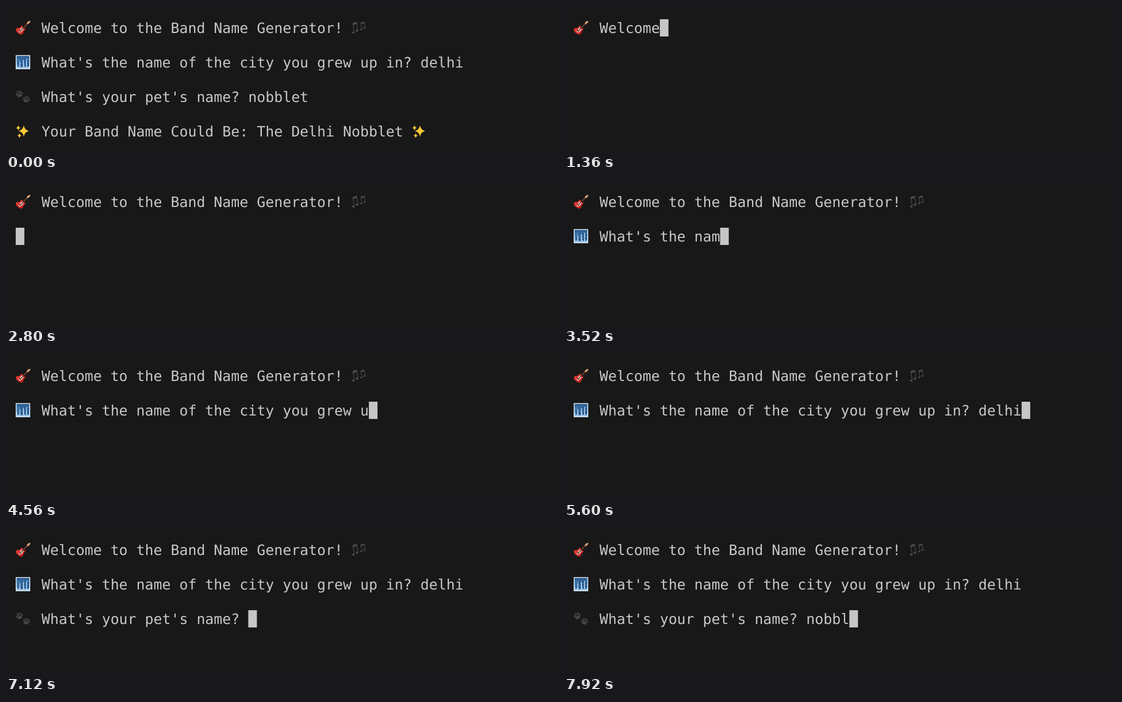
Recreate the animation shown at these times as an HTML page. Size 960 px wide and 254 px high, loop 8 s.

```html
<!DOCTYPE html>
<html lang="en">
<head>
<meta charset="utf-8">
<title>Band Name Generator</title>
<style>
html, body { margin: 0; width: 100%; height: 100%; overflow: hidden; background: #181818; }
svg { display: block; }
text {
  font: 24.88px "DejaVu Sans Mono", "Liberation Mono", monospace;
  fill: #c8c8c8; white-space: pre; text-rendering: geometricPrecision;
}
</style>
</head>
<body>
<svg id="stage" width="960" height="254" viewBox="0 0 960 254">
  <defs>
    <linearGradient id="sky" x2="0" y2="1">
      <stop stop-color="#245689"/><stop offset=".6" stop-color="#5b96cb"/><stop offset="1" stop-color="#c4dff3"/>
    </linearGradient>
    <linearGradient id="red" x2="1" y2="1">
      <stop stop-color="#f0473c"/><stop offset="1" stop-color="#b5120f"/>
    </linearGradient>

    <!-- Icons sit in a 26 x 30 cell -->
    <g id="guitar">
      <path d="M12 16 21 7" stroke="#6b3d2b" stroke-width="2.4"/>
      <path d="M19 7 22 3.6 25.6 3 24.8 5.6 21 9Z" fill="#e0a877"/>
      <path d="M.4 19C-.2 16.500 2 15 5 15.400 7.500 15.600 8 13 10 11.800 11.500 11 12.600 12 11.800 13.600L14.600 16.500C16 15.700 17.600 16.300 16.800 18 15.800 20 13.400 20.600 13.300 23 13.200 26 10.500 27.600 8 26.500 4.500 25 1 22.300 .4 19Z" fill="url(#red)"/>
      <path d="M7.500 17 11 14.500 14 17.500 11.500 20.500 9 23 8 20.500Z" fill="#f3dcd6"/>
      <path d="M7 21.500 13.500 15" stroke="#55302a" stroke-width="1.700"/>
      <path d="M5 20.500 8 23.500" stroke="#d5d5d5" stroke-width="1.500"/>
    </g>
    <g id="city">
      <path d="M0 2.500H25.200V27H0Z" fill="#dcebf6"/>
      <path d="M1.500 4H23.700V25.500H1.500Z" fill="url(#sky)"/>
      <path d="M3 13H6.500V24H3ZM8.500 10H12.500V24H8.500ZM15 9H18V24H15ZM20 11H23V24H20Z" fill="#1f5088"/>
      <path d="M6.500 13H8V24H6.500ZM12.500 11H14V24H12.500ZM18 9H19.500V24H18Z" fill="#b3d4ee"/>
      <path d="M4 15.500H6M4 19H6M9.500 13H11.500M9.500 17H11.500M16 13H17.500M16 18H17.500M21 15H22.500" stroke="#79aeda"/>
      <path d="M1.500 23.500 6 21.500 10 23.500 15 22 19 23.500 23.700 21.500V25.500H1.500Z" fill="#9cc5e7"/>
    </g>
    <g id="notes" fill="#484b4f" stroke="#484b4f">
      <g id="pair">
        <path d="M4.500 22.500 2.200 7.500 8.500 5 11 19" fill="none" stroke-width="1.200"/>
        <path d="M2.200 7.500 8.500 5 8.900 7.500 2.600 10Z"/>
        <ellipse cx="2.900" cy="23.300" rx="1.900" ry="1.400"/>
        <ellipse cx="9.300" cy="20" rx="1.900" ry="1.400"/>
      </g>
      <use href="#pair" transform="translate(14 1) scale(.9 .72)"/>
    </g>
    <g id="print">
      <path d="M-.5-.8C2-.8 4.600 2 4.200 4.200 3.700 6 1.500 5 0 5.200-1.600 5.500-3.500 6.500-4.300 4.700-5 2.700-2.600-.8-.5-.8Z"/>
      <ellipse cx="-5" cy="-.2" rx="1.600" ry="2.200"/>
      <ellipse cx="-2.200" cy="-3.700" rx="1.600" ry="2.400"/>
      <ellipse cx="2" cy="-3.700" rx="1.600" ry="2.400"/>
      <ellipse cx="5" cy="-.6" rx="1.600" ry="2.200"/>
    </g>
    <g id="paws" fill="#464646">
      <use href="#print" transform="translate(6.500 10) rotate(-14) scale(.95)"/>
      <use href="#print" transform="translate(18.800 19.500) rotate(18) scale(.95)"/>
    </g>
    <path id="star" d="M0-10Q1.500-1.500 9 0 1.500 1.500 0 10-1.500 1.500-9 0-1.500-1.500 0-10Z"/>
    <g id="sparkles" fill="#fbc736">
      <use href="#star" x="14" y="14.500"/>
      <use href="#star" transform="translate(4.500 9) scale(.48)"/>
      <use href="#star" transform="translate(6.500 22.500) scale(.44)"/>
    </g>
  </defs>
  <rect width="960" height="254" fill="#181818"/>
  <rect id="cursor" width="15" height="30" fill="#c6c6c6"/>
</svg>
<script>
const LOOP = 8000, FRAME = 80, CLEAR = 880;
const LEFT = 16.9, CELL = 14.98, ROW = 60, KEY = 43.2;
const stage = document.getElementById("stage");
const cursor = document.getElementById("cursor");

// from: cursor enters the line; start: printing of the text; keys: times of the typed answer
const lines = [
  { icon: "guitar", tail: "notes", text: "Welcome to the Band Name Generator! ", from: CLEAR, start: 1025 },
  { icon: "city", text: "What's the name of the city you grew up in? ", answer: "delhi",
    from: 2709, start: 2895, keys: [5180, 5280, 5380, 5480, 5580] },
  { icon: "paws", text: "What's your pet's name? ", answer: "nobblet",
    from: 5740, start: 5855, keys: [7340, 7500, 7620, 7740, 7860] },
  { icon: "sparkles", tail: "sparkles", text: "Your Band Name Could Be: The Delhi Nobblet ", from: Infinity, start: Infinity }
];

function add(tag, attrs) {
  const el = document.createElementNS("http://www.w3.org/2000/svg", tag);
  for (const name in attrs) el.setAttribute(name, attrs[name]);
  return stage.appendChild(el);
}

function addIcon(name, col, row) {
  return add("use", { href: "#" + name, x: LEFT + col * CELL, y: 23 + row * ROW });
}

function show(el, visible) {
  el.style.display = visible ? "" : "none";
}

lines.forEach((line, row) => {
  line.iconEl = addIcon(line.icon, 0, row);
  line.textEl = add("text", { x: LEFT + 3 * CELL, y: 47 + row * ROW });
  if (line.tail) line.tailEl = addIcon(line.tail, 3 + line.text.length, row);
});

function draw(now) {
  const t = Math.floor(now % LOOP / FRAME) * FRAME;
  const full = t < CLEAR;
  show(cursor, !full);

  lines.forEach((line, row) => {
    const { text, answer = "", keys = [] } = line;
    const count = full ? Infinity : Math.floor((t - line.start) / KEY);
    const typed = full ? answer.length : keys.filter(k => k <= t).length;
    const shown = text.slice(0, Math.max(0, count)) + answer.slice(0, typed);
    const tailOn = count > text.length;

    line.textEl.textContent = shown;
    show(line.iconEl, count >= -1);
    if (line.tail) show(line.tailEl, tailOn);

    if (!full && t >= line.from) {
      const col = count < -1 ? 0 : count < 0 ? 2 : 3 + shown.length + (line.tail && tailOn ? 2 : 0);
      cursor.setAttribute("x", LEFT + col * CELL);
      cursor.setAttribute("y", 23 + row * ROW);
    }
  });
  requestAnimationFrame(() => draw(performance.now()));
}
draw(0);
</script>
</body>
</html>
```
